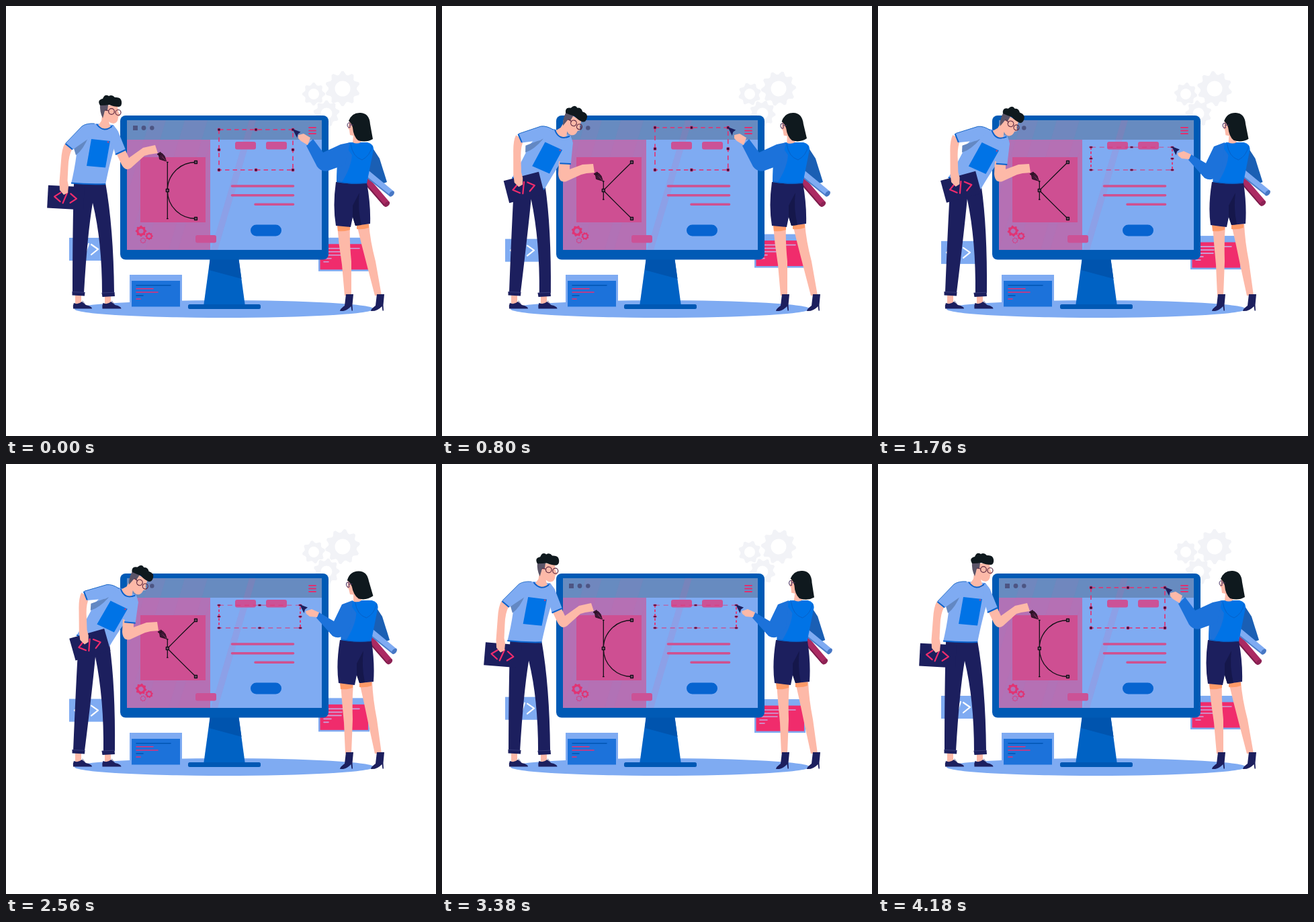
An HTML page for the animation above (4.2 s loop, 640 by 640 pixels).

```html
<!DOCTYPE html>
<html lang="en">
<head>
<meta charset="utf-8">
<title>Web design team</title>
<style>
html, body { margin: 0; height: 100%; overflow: hidden; background: #fff; }
svg { display: block; width: 100%; height: 100%; }
.line { fill: none; stroke-linecap: round; stroke-linejoin: round; }
.light { fill: #7fabf2; } .navy { fill: #1c1f5e; } .skin { fill: #fdb9a8; }
.blue { fill: #0073e6; } .mid { fill: #1c72da; } .black { fill: #0f191e; }
.edge { fill: none; stroke: #0a62cc; stroke-width: 2; }
.thin { fill: none; stroke: #0a5cbf; stroke-width: .8; }
</style>
</head>
<body>
<svg viewBox="0 0 640 640">
  <clipPath id="screen"><rect x="180" y="170" width="290" height="193"/></clipPath>
  <ellipse class="light" cx="325" cy="451" rx="223" ry="13"/>
  <g id="greyGears" fill="#f2f3f7" fill-rule="evenodd"></g>

  <g id="tagCard">
    <rect class="light" x="94" y="345" width="52" height="34"/>
    <path class="line" stroke="#fff" stroke-width="2.2" d="M112 355l-10 7 10 8M123 354l-6 17M127 355l10 7-10 8"/>
  </g>
  <g id="pinkCard">
    <rect class="light" x="465" y="0" width="76" height="50"/>
    <rect x="467.5" y="9.5" width="71.5" height="38" fill="#f02c6c"/>
    <path class="line" stroke="#c9a4dc" stroke-width="1.6" d="M472 16h54M472 21h28M472 26h27M473 31h11M473 36h7"/>
  </g>

  <rect class="light" x="184" y="400" width="78" height="50"/>
  <rect x="187" y="409" width="72" height="38.5" fill="#1c72da"/>
  <path class="line" stroke="#0054b4" stroke-width="1.6" d="M194 415.7h51M194 431h10"/>
  <path class="line" stroke="#e62f74" stroke-width="1.6" d="M194 420.7h25M194 426h32M194 436h6"/>

  <path fill="#0062c4" d="M304 374h42l10 73h-62z"/>
  <path fill="#0054ae" d="M304 374h42l4.500 32-48.500-13z"/>
  <rect x="271" y="444" width="108" height="7" rx="2.5" fill="#0058b4"/>
  <rect x="170" y="163" width="310" height="214.5" rx="8" fill="#005ab5"/>
  <g clip-path="url(#screen)">
    <rect class="light" x="180" y="170" width="290" height="193"/>
    <rect x="180" y="199" width="124" height="164" fill="#b172b6"/>
    <rect x="180" y="170" width="290" height="29" fill="#678bc0"/>
    <g fill="#e0559a" fill-opacity=".07">
      <path d="M214 170h24l-58 193h-24zM266 170h34l-58 193h-34zM304 199v164h-48l48-160z"/>
      <path fill-opacity=".13" d="M362 170h10l-57 193h-10z"/>
    </g>
    <rect x="200" y="225" width="97" height="97" fill="#ce4f92"/>
    <g fill="#4d5583">
      <rect x="189" y="178" width="7" height="7"/>
      <circle cx="205" cy="181.500" r="3.400"/><circle cx="217.300" cy="181.500" r="3.200"/>
    </g>
    <path class="line" stroke="#e02f70" stroke-width="1.8" d="M451 181h10M451 185.500h10M451 190h10"/>
    <g fill="#cb5296">
      <rect x="341" y="202" width="31" height="11.5" rx="3"/>
      <rect x="387" y="202" width="31" height="11.5" rx="3"/>
      <rect x="282" y="341" width="31" height="11.5" rx="3"/>
    </g>
    <path class="line" stroke="#d0508f" stroke-width="3.6" d="M336.500 268h91M336.500 281.800h91M371 295.300h56.500"/>
    <rect x="364" y="325.5" width="46" height="17" rx="8.5" fill="#0764d0"/>
    <g id="pinkGears" fill="#e03474" fill-rule="evenodd"></g>
  </g>
  <g class="line" stroke="#141018" stroke-width="1.3">
    <path id="handle"/><path id="curve"/>
    <path stroke-linecap="butt" fill="#7b4a6d" d="M280.500 230.500h4v4h-4zM280.500 314.500h4v4h-4zM238.300 272.500h4v4h-4z"/>
  </g>
  <g id="select">
    <rect x="317" y="184" width="110" height="60" fill="none" stroke="#e62f6f" stroke-width="1.6" stroke-dasharray="6.5 5"/>
    <g id="knobs" fill="#2a1238" stroke="#e62f6f" stroke-width=".8"></g>
  </g>

  <!-- woman -->
  <path id="backArm" fill="#1a5fb4" d="M543 207L556 227 567 262Q560 266 548 262L530 250Z"/>
  <g id="tubes">
    <path stroke="#ab2a62" stroke-width="10" d="M532 254L567 295"/>
    <path stroke="#7d1c4c" stroke-width="2" d="M530 259L563 297"/>
    <ellipse cx="567" cy="295" rx="5" ry="3" transform="rotate(-42 567 295)" fill="#8d2254"/>
    <path stroke="#7fabf2" stroke-width="9" d="M528 241L574 279"/>
    <path stroke="#4c7fcb" stroke-width="2" d="M526 246L571 282"/>
    <ellipse cx="574" cy="279.5" rx="5" ry="3" transform="rotate(-50 574 279.500)" fill="#4777c4"/>
  </g>
  <path id="legL" class="skin"/><path id="legR" class="skin"/>
  <g id="hems" fill="#ff9a68"><path d="M493 326h19v7q-8 3-18 2z"/><path d="M522 325h18v5q-8 3-18 2z"/></g>
  <g class="navy">
    <path id="boot" d="M506 429L517 429 515.500 445 516 453.500 514.500 453.500 513.500 447Q506 455 497 454 497 451 504 446Z"/>
    <use href="#boot" x="46"/>
    <path id="shorts"/>
  </g>
  <path id="fold" fill="#15174b"/>
  <g id="her">
    <path class="blue" d="M512 203L538 203Q548 206 547 214L537 264Q513 266 492 262L493 236 500 208Z"/>
    <path class="mid" d="M504 206L515 222Q514 240 500 262L492 262 493 236Z"/>
    <path class="thin" d="M513 205Q516 225 530 229 542 223 545 208M493 261Q514 266 537 263"/>
    <g id="herHead">
      <path class="skin" d="M511 171L510 178 509 182 511 184 512 192 517 193 516 203Q522 206 528 203L527 180Z"/>
      <path class="black" d="M510 171Q515 158 528 159 541 160 542 176L546 198Q536 204 524 200 517 194 516 181 514 174 510 171Z"/>
      <path fill="none" stroke="#4b3161" d="M517 177L512 177M512 174Q508 173 508 178 509 182 512 181Z"/>
    </g>
  </g>
  <path id="herArm" class="mid"/>
  <path id="cursor" class="navy" d="M426.500 183L438.500 187.500 434.500 190.500 433 196Z"/>
  <path id="herHand" class="skin"/>

  <!-- man -->
  <g class="skin"><path d="M103 428h9v15h-9zM147 428h9v15h-9z"/></g>
  <g class="navy">
    <path id="shoe" d="M101 442Q107 445 113 440L119 445Q128 447 128 450.500L100 450.500Q99 446 101 442Z"/>
    <use href="#shoe" x="43.5"/>
    <path id="pants"/>
    <path d="M98.500 425l19 1-.5 5.500-18.500-1zM142.500 427l19-1 .5 6-18.500 1z"/>
  </g>
  <path class="line" stroke="#454a86" stroke-width=".7" d="M99 425.500l18 .8M143 427l18-.8M114 439l3 4M157.500 439l3 4"/>
  <g class="torso">
    <path class="light" d="M134 175L160 177 167 187 163 205Q155 230 148 266L97 264Q104 235 106 210L120 179Z"/>
    <path fill="#6388c3" d="M123 194L101 212 104 222Q115 214 123 194Z"/>
    <path class="edge" d="M97 263.500Q122 266 148 265"/>
    <path class="blue" d="M127 198L155 201 148 240.500 120 238Z"/>
    <circle cx="152" cy="202.500" r="1.300" fill="#b5477f"/>
    <g id="hisHead">
      <path class="skin" d="M145 147L166 149 167 157 170 163 167 165Q167 174 160 175 156 175 153 172L156 182Q147 188 137 178L142 171Z"/>
      <path fill="#5b5468" d="M140 146L152 147 151 156Q147 153 146 160L144 167Q139 157 140 146Z"/>
      <path class="black" d="M140 148Q135 140 144 138 147 130 153 134 158 131 162 136 171 135 172 142 173 149 168 150 160 150 154 147 148 148 140 148Z"/>
      <g fill="none" stroke="#5d2a42" stroke-width="1.2">
        <circle cx="157" cy="157" r="4.300"/><circle cx="167" cy="158.500" r="4"/><path d="M153 156l-6-1"/>
      </g>
    </g>
    <path class="edge" d="M135 176Q146 190 159 178"/>
  </g>
  <g id="panel">
    <rect class="navy" x="62" y="268" width="54" height="34"/>
    <path class="line" stroke="#f02c6c" stroke-width="2.2" d="M81 278l-9 6.500 9 7M91 277l-6 16.500M96 279l9 7-9 6.500"/>
  </g>
  <g id="pen">
    <path fill="#3c1633" stroke="#180a14" stroke-width=".8" d="M238.500 231L228.500 228 227.500 222 232.500 219.500 236 223.500ZM225 220.500L230 217.500 231.500 219.500 227 222Z"/>
    <path fill="none" stroke="#b84a83" stroke-width=".6" d="M238 230.500L232 224"/>
  </g>
  <path id="hisArm" class="skin"/>
  <g class="torso">
    <g class="sleeveL">
      <path id="armL" class="skin" d="M88 204L99 212Q93 222 92.500 240L91.500 260 93 268 92 278 86 281 80 274 79.500 262 82 230Q83 212 88 204Z"/>
      <path class="light" d="M132 175Q120 174 113 179L88 205 99 214 122 198Z"/>
      <path class="edge" d="M88.500 205L99 213.500"/>
      <path class="thin" d="M132 175Q120 174 113 179L89 204"/>
    </g>
    <g class="sleeveR">
      <path class="light" d="M158 178Q164 181 167 187L178 214 163 221.500 157 200Z"/>
      <path class="edge" d="M163 221L178 214"/>
    </g>
  </g>
</svg>
<script>
const LOOP = 4200;
const $ = id => document.getElementById(id);
const move = (id, value) => $(id).setAttribute('transform', value);
const shape = (id, value) => $(id).setAttribute('d', value);
const each = (name, value) =>
  document.querySelectorAll('.' + name).forEach(el => el.setAttribute('transform', value));

// Eased value between [time, value] pairs given as a flat list.
function key(t, ...k) {
  let i = 0;
  while (i + 2 < k.length && t >= k[i + 2]) i += 2;
  if (i + 2 >= k.length) return k[i + 1];
  const u = (t - k[i]) / (k[i + 2] - k[i]);
  return k[i + 1] + (k[i + 3] - k[i + 1]) * u * u * (3 - 2 * u);
}

// Blend two paths of the same structure.
function mix(a, b, k) {
  const number = /-?[\d.]+/g, ends = b.match(number);
  let i = 0;
  return a.replace(number, n => (+n + (ends[i++] - n) * k).toFixed(2));
}

function addGear(parent, x, y, r, hole, teeth) {
  let d = '';
  for (let i = 0; i < teeth * 4; i++) {
    const a = (i - 0.5 + (i % 2 ? -0.12 : 0.12)) / teeth * Math.PI / 2 - Math.PI / 2;
    const q = i % 4 < 2 ? r : r * 0.81;
    d += (i ? 'L' : 'M') + (q * Math.cos(a)).toFixed(2) + ' ' + (q * Math.sin(a)).toFixed(2);
  }
  d += `ZM${hole} 0A${hole} ${hole} 0 1 0 ${-hole} 0A${hole} ${hole} 0 1 0 ${hole} 0Z`;
  const el = document.createElementNS('http://www.w3.org/2000/svg', 'path');
  el.setAttribute('d', d);
  $(parent).append(el);
  return { el, x, y, step: 360 / teeth };
}

const gears = [
  addGear('greyGears', 501, 123, 26, 11.5, 10),
  addGear('greyGears', 458, 131, 17, 8, 8),
  addGear('greyGears', 477, 160, 19.5, 8.5, 9),
  addGear('pinkGears', 201, 335, 8.3, 3.6, 8),
  addGear('pinkGears', 213, 342.5, 5.8, 2.6, 8),
  addGear('pinkGears', 204, 349, 4.6, 2.8, 8)
];
gears[5].el.setAttribute('fill', '#d0458a');

for (const x of [317, 372, 427])
  for (const y of [184, 214, 244])
    if (x !== 372 || y !== 214)
      $('knobs').innerHTML += `<rect x="${x - 2}" y="${y - 2}" width="4" height="4" rx="1"/>`;

function drawMan(t) {
  const bend = key(t, 0, 0, 60, 0, 560, .87, 800, .92, 1220, 1, 2000, .95, 2540, 1, 3200, .05, 3380, .04, 4150, 0);
  const pen = key(t, 0, 0, 60, 0, 560, 1, 2540, 1, 3200, 0);
  const tilt = key(t, 0, 3, 2700, 3, 3380, 5.5, 4180, 3);
  each('torso', `rotate(${20 * bend} 126 282)`);
  each('sleeveL', `rotate(${10 * bend} 122 182)`);
  each('sleeveR', `rotate(${10 * bend} 160 188)`);
  move('hisHead', `rotate(${6 * bend} 150 172)`);
  move('armL', `rotate(${-35 * bend} 94 209)`);
  move('panel', `translate(${36 * bend} ${-16 * bend}) rotate(${tilt - 19 * bend} 88 285)`);
  move('pen', `translate(${pen} ${29.5 * pen})`);
  shape('hisArm', mix(
    'M164 219L177 213 183 226 204 211 222 207 226 219 213 221 206 223 186 241Q178 247 172 236Z',
    'M174 231L190 236 190 243 209 236 225 235 227 248 215 249 207 251 185 261Q174 264 173 250Z', pen));
  shape('pants', mix(
    'M101 264L148 263Q160 330 161 427L143 428Q143 350 129 293 121 340 116 427L99 427Q99 330 101 264Z',
    'M108 262L154 268Q163 330 162 427L145 428Q146 350 133 287 128 340 117 427L100 427Q104 330 108 262Z', bend));
  shape('curve', mix(
    'M282.5 232.5C259 232.5 240.3 251 240.3 274.5C240.3 298 259 316.5 282.5 316.5',
    'M282.5 232.5C268 246.5 254 260.5 240.3 274.5C254 288.5 268 302.5 282.5 316.5', pen));
  const half = 42 - 28.5 * pen, top = 274.5 - half, low = 274.5 + half;
  shape('handle', `M240.3 ${top}V${low}M239.5 ${top}h1.6M239.5 ${low}h1.6`);
}

function drawWoman(t) {
  const drag = key(t, 0, 0, 560, 0, 800, -.115, 1500, 1, 3450, 1, 4080, 0);
  const reach = key(t, 0, 0, 800, 0, 1250, 1, 3450, 1, 4080, 0);
  const lean = key(t, 0, 0, 850, 0, 1200, 1.1, 1600, 1, 3450, 1, 4080, 0);
  const swing = key(t, 0, 0, 820, 0, 1250, 12.5, 1760, 6, 2560, 4, 3380, 3, 4180, 0);
  const nod = key(t, 0, 0, 250, 0, 800, -3, 1220, 1, 1760, -1, 2560, -6, 3380, 1.5, 4150, 0);
  move('select', `translate(317 244) scale(${1 + .1 * drag} ${1 - .435 * drag}) translate(-317 -244)`);
  move('cursor', `translate(${10.5 * drag} ${26 * drag})`);
  move('her', `translate(${6.5 * lean} 0)`);
  move('herHead', `rotate(${nod} 527 255)`);
  move('backArm', `translate(${swing * .75 + lean} 0)`);
  move('tubes', `translate(${swing} ${-swing * .2})`);
  move('hems', `translate(${4 * lean} 0)`);
  shape('herHand', mix(
    'M435 192L443 190 453 196 449 207 439 201 435 197Z',
    'M446 219L455 216 466 221 463 228 452 227 447 223Z', reach));
  shape('herArm', mix(
    'M457 198L472 218 498 206 512 203 505 236 480 245Q470 248 463 239L447 208Z',
    'M466 221L488 234 500 209 516 203 512 243 505 252Q497 262 486 256L462 229Z', reach));
  shape('shorts', mix(
    'M491 262L537 263Q543 296 542 324L520 327 516 314 513 329 491 327Q486 298 491 262Z',
    'M497 262L544 263Q549 296 547 324L526 326 522 314 519 329 495 326Q491 298 497 262Z', lean));
  shape('fold', mix(
    'M526 278L516 297 516 314 520 327 529 326Q523 300 526 278Z',
    'M532 278L522 297 522 314 526 326 534 325Q529 300 532 278Z', lean));
  shape('legL', mix(
    'M493 326L512 326Q511 350 514 380L514 431 504 431 500 385Q495 355 493 326Z',
    'M498 326L517 326Q515 350 516 380L514 431 505 431 503 385Q500 355 498 326Z', lean));
  shape('legR', mix(
    'M522 325L540 323Q542 350 550 380L559 431 549 431 537 385Q529 355 522 325Z',
    'M526 325L545 323Q546 350 552 380L559 431 549 431 539 385Q533 355 526 325Z', lean));
}

function frame(now) {
  const t = now % LOOP, turn = t / LOOP * 2 * Math.PI;
  move('tagCard', `translate(0 ${2.6 * (1 - Math.cos(turn))})`);
  move('pinkCard', `translate(0 ${344.8 - 5.6 * Math.sin(turn)})`);
  gears.forEach((g, i) => g.el.setAttribute('transform',
    `translate(${g.x} ${g.y}) rotate(${(i % 3 === 1 ? -2 : 2) * g.step * t / LOOP})`));
  drawMan(t);
  drawWoman(t);
  requestAnimationFrame(frame);
}
frame(performance.now());
</script>
</body>
</html>
```
